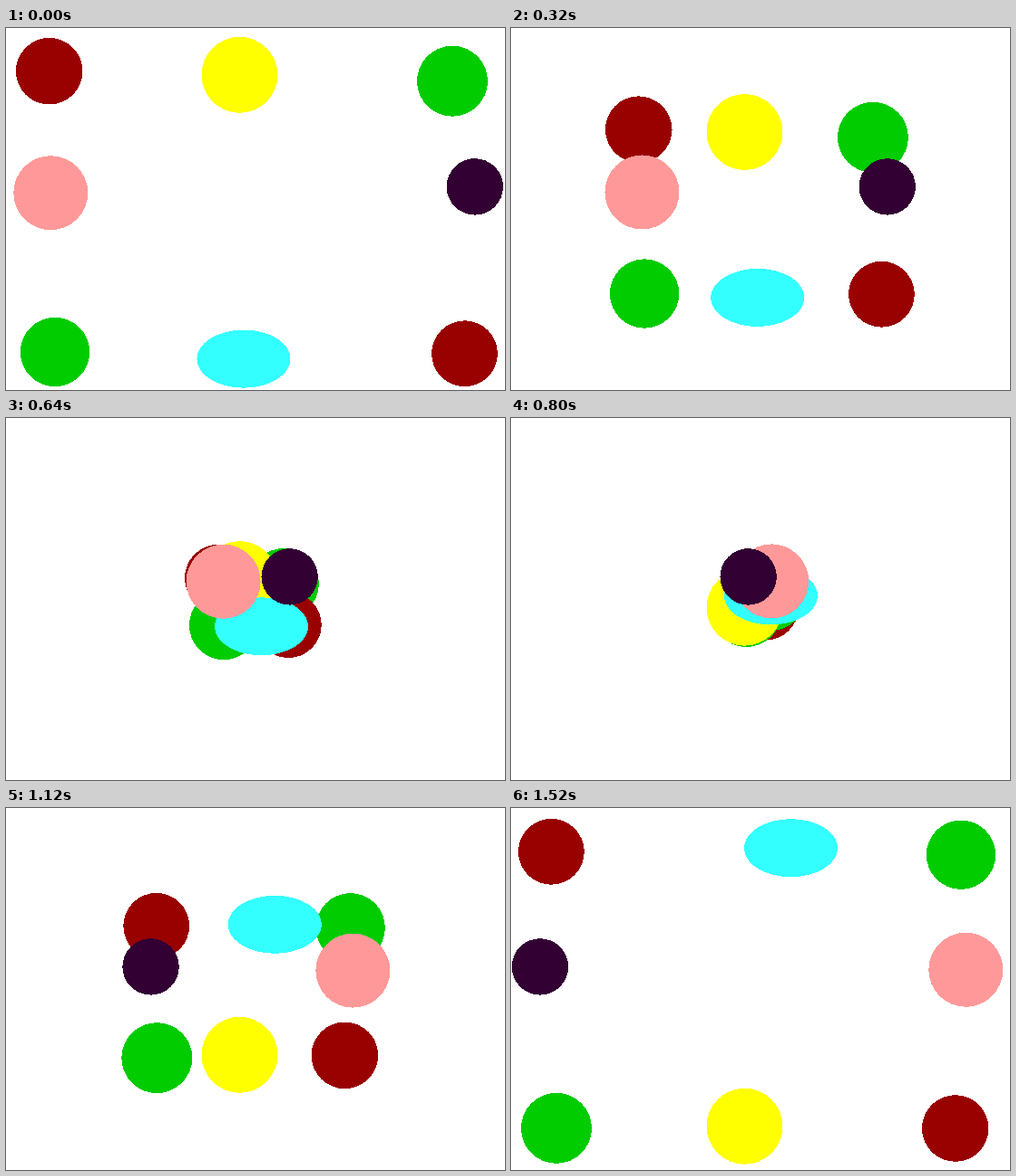
Write an HTML page that moves like this. It is 550 px wide and 400 px high and loops after 1600 ms.

```html
<!DOCTYPE html>
<html lang="en">
<head>
<meta charset="utf-8">
<title>Crossing discs</title>
<style>
  html, body { margin: 0; width: 100%; height: 100%; overflow: hidden; background: #fff; }
  svg { display: block; width: 550px; height: 400px; }
</style>
</head>
<body>
<svg id="stage" viewBox="0 0 550 400" shape-rendering="crispEdges"></svg>
<script>
  const STEP = 80, STEPS = 20;
  const NS = 'http://www.w3.org/2000/svg';
  const stage = document.getElementById('stage');

  // Listed from back to front; each disc crosses the stage in a straight line.
  const discs = [
    { fill: '#990000', rx: 36.8, from: [47.7, 47.7], to: [489.7, 354] },
    { fill: '#00cc00', rx: 39, from: [492, 58.7], to: [50, 353.8] },
    { fill: '#990000', rx: 36.4, from: [505.5, 359.8], to: [44.4, 48.3] },
    { fill: '#00cc00', rx: 38.2, from: [54, 358], to: [496, 51.7] },
    { fill: '#ffff00', rx: 42, from: [257.5, 51.8], to: [257.5, 351.7] },
    { fill: '#33ffff', rx: 51.5, ry: 32, from: [262, 365.6], to: [308.5, 44.2] },
    { fill: '#ff9999', rx: 41, from: [49.3, 182.2], to: [501.3, 178.7] },
    { fill: '#330033', rx: 31.2, from: [516.8, 175.4], to: [32, 175.4] }
  ];

  for (const d of discs) {
    d.node = document.createElementNS(NS, 'ellipse');
    d.node.setAttribute('fill', d.fill);
    d.node.setAttribute('rx', d.rx);
    d.node.setAttribute('ry', d.ry || d.rx);
    stage.appendChild(d.node);
  }

  const mix = (a, b, k) => a + (b - a) * k;

  function draw(ms) {
    const k = Math.floor(ms / STEP) % STEPS / (STEPS - 1);
    for (const { node, from, to } of discs) {
      node.setAttribute('cx', mix(from[0], to[0], k));
      node.setAttribute('cy', mix(from[1], to[1], k));
    }
  }

  const start = performance.now();
  function tick() {
    draw(performance.now() - start);
    requestAnimationFrame(tick);
  }
  tick();
</script>
</body>
</html>
```
